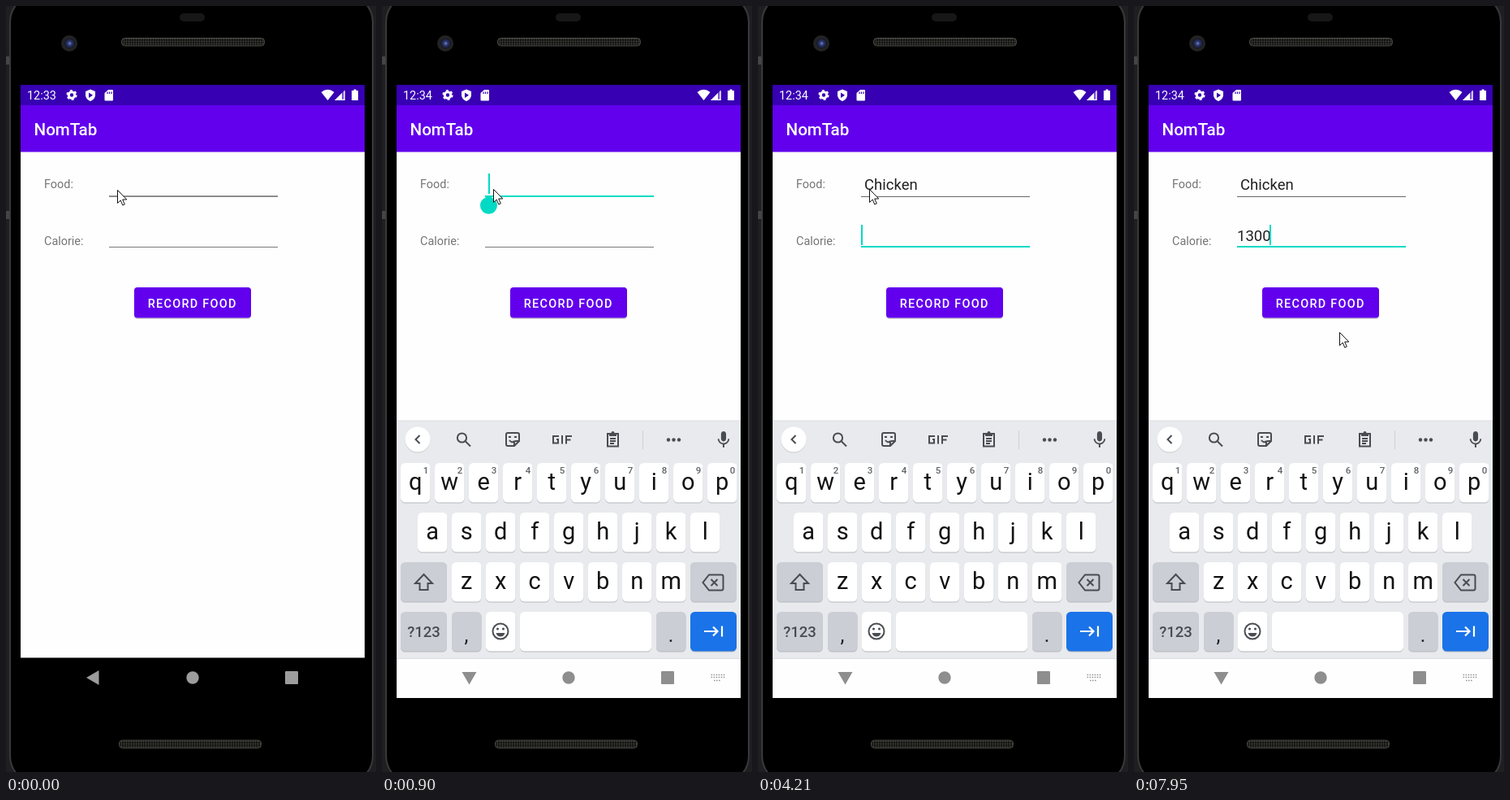
Animation of 456 by 942 pixels, one loop 8 s. Source, as an HTML page:

```html
<!DOCTYPE html>
<html lang="en">
<head>
<meta charset="utf-8">
<title>Food log</title>
<style>
  html, body { margin: 0; width: 100%; height: 100%; overflow: hidden; background: #1f1f22; }
  svg { display: block; width: 456px; height: 942px; font-family: Roboto, "Open Sans", sans-serif; }
  .mid { text-anchor: middle; }
  .label { font-size: 14.43px; fill: #757575; }
  .input { font-size: 18.55px; fill: #212121; }
  .letter { font-size: 29px; fill: #121212; text-anchor: middle; }
  .hint { font-size: 11.5px; font-weight: 500; fill: #5f6368; text-anchor: middle; }
  .word { font-size: 18.55px; fill: #505357; text-anchor: middle; }
  .icon { fill: #494c50; }
  .line { fill: none; stroke: #494c50; stroke-width: 2; }
  .teal { fill: #03dac5; }
</style>
</head>
<body>
<svg viewBox="0 0 456 942">
  <defs>
    <pattern id="mesh" width="3" height="3" patternUnits="userSpaceOnUse">
      <rect width="3" height="3" fill="#131312"/>
      <circle cx="1.5" cy="1.5" r=".9" fill="#45453f"/>
    </pattern>
    <radialGradient id="lens">
      <stop offset="0" stop-color="#7385c4"/>
      <stop offset=".4" stop-color="#2b3770"/>
      <stop offset="1" stop-color="#14161f"/>
    </radialGradient>
    <clipPath id="screen"><rect x="18" y="97" width="424" height="754"/></clipPath>
  </defs>

  <!-- phone body -->
  <rect width="456" height="942" fill="#1f1f22"/>
  <rect x="5" y="-14" width="447" height="970" rx="34" stroke="#39393b" stroke-width="2"/>
  <path d="M0 62h4v10H0zM0 252h4v10H0z" fill="#454547"/>
  <rect x="214" y="9" width="31" height="10" rx="5" fill="#171718"/>
  <circle cx="78" cy="46" r="10" fill="#232324"/>
  <circle cx="78.5" cy="46" r="6.5" fill="url(#lens)"/>
  <g fill="url(#mesh)" stroke="#4b4b46">
    <rect x="142.5" y="39.500" width="176" height="9.500" rx="4"/>
    <rect x="139.5" y="903" width="175" height="9.500" rx="4"/>
  </g>

  <!-- app -->
  <rect x="18" y="97" width="424" height="25" fill="#3700b3"/>
  <rect x="18" y="122" width="424" height="58" fill="#6200ee"/>
  <rect x="18" y="179.500" width="424" height="622" fill="#fefefe"/>
  <text id="clock" x="26" y="115" font-size="14.43" fill="#fff"></text>
  <g fill="#fff">
    <circle cx="81" cy="109.500" r="3.700" fill="none" stroke="#fff" stroke-width="3"/>
    <circle cx="81" cy="109.500" r="5.700" fill="none" stroke="#fff" stroke-width="1.800" stroke-dasharray="3 2.970"/>
    <path d="M104 102.500l6 2.600v4.200c0 3.600-2.500 6.500-6 7.700-3.500-1.200-6-4.100-6-7.700v-4.200z"/>
    <path d="M102 106.500v6.400l5-3.200z" fill="#3700b3"/>
    <path d="M126 103h5q1 0 1 1v11.500q0 1-1 1h-8.500q-1 0-1-1V107z"/>
    <path d="M125 105.500v2.500M127.500 105.500v2.500M130 105.500v2.500" stroke="#3700b3" stroke-width="1.200"/>
    <path d="M396.500 116l-8-10q8-6.500 16 0z"/>
    <path d="M418 103v13h-13z" fill-opacity=".35"/>
    <path d="M414 107v9h-9z"/><path d="M417 104.500v10.800h-9" fill="none" stroke="#fff" stroke-width="1.300"/>
    <path d="M428.500 102.500h3v1.500h2.500v12h-8v-12h2.500z"/>
  </g>
  <text x="34.500" y="159" font-size="20.600" font-weight="500" fill="#fff">NomTab</text>
  <text class="label" x="47" y="224">Food:</text>
  <text class="label" x="47" y="294">Calorie:</text>
  <rect id="foodLine" x="127" width="208"/>
  <rect id="calLine" x="127" width="208"/>
  <text id="food" class="input" x="131" y="226"></text>
  <rect id="under" x="132" y="227" height="1" fill="#212121"/>
  <text id="cal" class="input" x="127" y="289"></text>
  <rect id="foodCaret" class="teal" y="206" width="2" height="25"/>
  <rect id="calCaret" class="teal" y="269" width="2" height="25"/>
  <path id="handle" class="teal" d="M131.500 233l7 4.500a10.500 10.500 0 1 1-14 0z"/>
  <rect x="158" y="347" width="144" height="38" rx="4" fill="#000" opacity=".18"/>
  <rect x="158" y="346" width="144" height="37.500" rx="4" fill="#6200ee"/>
  <text x="174.700" y="370.500" font-size="14.430" font-weight="500" letter-spacing="1.290" fill="#fff">RECORD FOOD</text>

  <!-- keyboard, drawn at rest and shifted while it slides in -->
  <g clip-path="url(#screen)">
    <g id="board">
      <rect x="18" y="510" width="424" height="292" fill="#e8eaed"/>
      <rect x="18" y="802" width="424" height="140" fill="#fefefe"/>
      <path d="M18 510h424M18 802.500h424" stroke="#dcdee0"/>
      <circle cx="44" cy="534" r="15.500" fill="#c8cacd"/>
      <circle cx="44" cy="533" r="15.500" fill="#fff"/>
      <path id="chevron" class="line"/>
      <path class="icon" transform="translate(408.600 521) scale(1.030)" d="M12 14c1.660 0 3-1.340 3-3V5c0-1.660-1.340-3-3-3S9 3.340 9 5v6c0 1.660 1.340 3 3 3zm5.300-3c0 3-2.540 5.100-5.300 5.100S6.700 14 6.700 11H5c0 3.410 2.720 6.230 6 6.720V21h2v-3.280c3.280-.480 6-3.300 6-6.720z"/>
      <g id="tools">
        <circle class="line" cx="98.500" cy="531" r="5.600"/>
        <path class="line" d="M102.500 535l6.500 6.500" stroke-width="2.400"/>
        <path class="line" d="M155 525h12q2 0 2 2v8l-6 6h-8q-2 0-2-2v-12q0-2 2-2zM169 535h-4q-2 0-2 2v4M157 534q3 4 6 1" stroke-width="1.800"/>
        <path class="icon" d="M156 529h3v2h-3zM163 529h3v2h-3z"/>
        <path class="line" d="M218 529h-7v8.500h6v-4.500h-2M222 528v10.500M227 538.500v-9.500h7M227 533.500h5.500" stroke-width="2.400"/>
        <path class="line" d="M278 526h13v15.500h-13z"/>
        <path class="icon" d="M280 525h2.500a2 2 0 0 1 4 0h2.500v4h-9z"/>
        <path class="line" d="M281 532h7M281 535h7M281 538h5" stroke-width="1.500"/>
        <path d="M321.500 522v23" stroke="#cfd1d4"/>
        <circle class="icon" cx="353" cy="533.500" r="2.200"/>
        <circle class="icon" cx="359.500" cy="533.500" r="2.200"/>
        <circle class="icon" cx="366" cy="533.500" r="2.200"/>
      </g>
      <g id="words">
        <path d="M167 521v25M291 521v25" stroke="#c6c8cb" stroke-width="1.500"/>
        <text class="word" x="111.500" y="540"></text>
        <text class="word" x="228.500" y="540"></text>
        <text class="word" x="346" y="540"></text>
      </g>
      <g id="keys"></g>
      <path class="line" d="M51.500 699l10.500 11h-5.500v8h-10v-8H41z"/>
      <path class="line" d="M403 699.500h15.500q2 0 2 2v15q0 2-2 2H403l-7.500-9.500zM405.500 705l8 8M413.500 705l-8 8"/>
      <circle class="line" cx="146" cy="769" r="9.500"/>
      <circle class="icon" cx="142.500" cy="766" r="1.500"/>
      <circle class="icon" cx="149.500" cy="766" r="1.500"/>
      <path class="icon" d="M140.500 771h11q-1.500 4.500-5.500 4.500t-5.500-4.500z"/>
      <path d="M397 769h16M408 763.500l5.500 5.500-5.500 5.500M419 762.500v13" fill="none" stroke="#fff" stroke-width="2.200"/>
      <text x="51.500" y="775.500" class="mid icon" font-size="18.550" font-weight="500">?123</text>
      <text x="104" y="782" class="mid" font-size="25" fill="#222">,</text>
      <text x="356" y="782" class="mid" font-size="25" fill="#222">.</text>
    </g>
  </g>

  <!-- navigation -->
  <g id="nav">
    <path id="back" d="M-8.500 0l15.500-9v18z"/>
    <circle cx="230" cy="826" r="7.700"/>
    <rect x="344" y="818" width="16" height="16" rx="1"/>
    <path id="dots" d="M405.500 822.500h17M405.500 825.500h17M409 829.500h9" stroke="#969696" stroke-width="1.600" stroke-dasharray="1.600 1.450"/>
  </g>
  <path id="cursor" d="M.5 .5v16l3.700-3.500 2.600 6 2.500-1.100-2.600-5.900h5.100z" fill="#fff" stroke="#111"/>
</svg>
<script>
const $ = id => document.getElementById(id);
const LOOP = 8000;

function key(x, y, w, fill = '#fff') {
  const box = (dy, c) => `<rect x="${x}" y="${y + dy}" width="${w}" height="48.500" rx="5.500" fill="${c}"/>`;
  return box(1, '#b6b9bd') + box(0, fill);
}

function buildKeys() {
  const gray = '#cbced5';
  const rows = [['qwertyuiop', 23, 562], ['asdfghjkl', 44, 623], ['zxcvbnm', 86, 684]];
  let out = '';
  rows.forEach(([letters, left, y], r) => [...letters].forEach((ch, i) => {
    const x = left + 42 * i;
    out += key(x, y, 36.5) + `<text class="letter" x="${x + 18.2}" y="${y + 33}">${ch}</text>`;
    if (!r) out += `<text class="hint" x="${x + 31}" y="${y + 12.5}">${(i + 1) % 10}</text>`;
  }));
  out += key(23, 684, 57, gray) + key(380, 684, 57, gray) + key(23, 745, 57, gray) + key(86, 745, 36.5, gray)
    + key(128, 745, 36.5) + key(170, 745, 162) + key(338, 745, 36.5, gray) + key(380, 745, 57, '#1a73e8');
  $('keys').innerHTML = out;
}

// Each step overrides only what changes; words are the suggestion strip.
const start = {
  clock: '12:33', focus: '', food: '', cal: '', foodOn: 0, calOn: 0, handle: 0,
  slide: null, turn: 0, words: '', cursor: [137, 226]
};
const steps = [
  [0, {}],
  [250, { focus: 'food' }],
  [400, { foodOn: 1, handle: 1, cursor: [137, 225] }],
  [520, { slide: 120 }],
  [640, { slide: 12.5, turn: -12 }],
  [760, { slide: 0, turn: -70 }],
  [900, { turn: -90, clock: '12:34' }],
  [1030, { food: 'C', handle: 0 }],
  [1180, { food: 'Ch', words: 'C,Can,Call' }],
  [1300, { food: 'Cho' }],
  [1450, { food: 'Choi', words: 'Ch,Check,Chori' }],
  [1600, { food: 'Choic', words: 'Choi,Choice,Cho I' }],
  [1880, { words: 'Choic,Choice,Choices' }],
  [2030, { food: 'Choi', words: 'Choi,Choice,Cho I' }],
  [2150, { food: 'Cho', words: 'Cho,Chose,Choose' }],
  [2550, { food: 'Ch' }],
  [2670, { words: 'Ch,Check,Chori' }],
  [3200, { food: 'Chi' }],
  [3320, { food: 'Chic', words: 'Chi,Child,Chip' }],
  [3440, { food: 'Chick', words: 'Chic,Chick,Chicken' }],
  [3690, { food: 'Chicke', words: 'Chick,Chicks,Chicken' }],
  [3810, { food: 'Chicken', words: 'Chicke,Chick,Chickens' }],
  [4060, { words: 'Chicken,Chicken,Chickens' }],
  [4210, { focus: 'cal', foodOn: 0, calOn: 1, words: '' }],
  [4640, { calOn: 0 }],
  [4890, { cal: '1', calOn: 1 }],
  [5170, { cal: '13' }],
  [5310, { cal: '133' }],
  [5850, { calOn: 0 }],
  [6130, { cal: '13', calOn: 1 }],
  [6640, { calOn: 0 }],
  [6760, { cal: '130', calOn: 1 }],
  [7020, { cal: '1300' }],
  [7420, { calOn: 0 }],
  [7570, { cursor: [185, 290] }],
  [7690, { cursor: [262, 402] }],
  [7810, { cursor: [280, 396] }],
  [7950, { cursor: [253, 401], calOn: 1 }]
];
let last = start;
const states = steps.map(([at, change]) => [at, last = { ...last, ...change }]);

const show = (id, on) => $(id).style.display = on ? '' : 'none';
const set = (id, attrs) => { for (const k in attrs) $(id).setAttribute(k, attrs[k]); };

function field(id, y, active, idle) {
  set(id, active ? { y: y - 1, height: 2, fill: '#03dac5' } : { y, height: 1, fill: idle });
}

function draw(s) {
  const open = s.slide !== null;
  $('clock').textContent = s.clock;
  $('food').textContent = s.food;
  $('cal').textContent = s.cal;
  field('foodLine', 234, s.focus === 'food', '#686868');
  field('calLine', 296, s.focus === 'cal', '#7a7a7a');
  if (!s.focus) set('foodLine', { y: 233.3, height: 1.5 });

  set('foodCaret', { x: Math.round(131 + (s.food ? $('food').getComputedTextLength() : 0)) });
  set('calCaret', { x: 127 + 10 * s.cal.length });
  show('foodCaret', s.foodOn);
  show('calCaret', s.calOn);
  show('handle', s.handle);

  const words = s.words.split(',');
  const marked = Math.min(words[0].length, s.food.length);
  set('under', { width: marked ? Math.max(0, $('food').getSubStringLength(0, marked) - 1) : 0 });
  show('words', s.words);
  show('tools', !s.words);
  document.querySelectorAll('.word').forEach((el, i) => el.textContent = words[i] || '');
  set('chevron', { d: s.words ? 'M41 528l5 5-5 5' : 'M46.500 528l-5 5 5 5' });

  show('board', open);
  set('board', { transform: `translate(0 ${s.slide || 0})` });
  set('nav', { fill: open ? '#8e8e8e' : '#9c9c9c' });
  set('back', { transform: `translate(107.500 826) rotate(${s.turn})` });
  show('dots', open);
  set('cursor', { transform: `translate(${s.cursor})` });
}

let shown;
function tick(now) {
  const t = now % LOOP;
  let i = states.length - 1;
  while (states[i][0] > t) i--;
  if (i !== shown) draw(states[shown = i][1]);
  requestAnimationFrame(tick);
}

buildKeys();
draw(states[0][1]);
const t0 = performance.now();
requestAnimationFrame(function loop(now) {
  tickFrom(now);
});
function tickFrom(now) {
  const t = Math.max(0, now - t0) % LOOP;
  let i = states.length - 1;
  while (states[i][0] > t) i--;
  if (i !== shown) draw(states[shown = i][1]);
  requestAnimationFrame(tickFrom);
}
</script>
</body>
</html>
```
